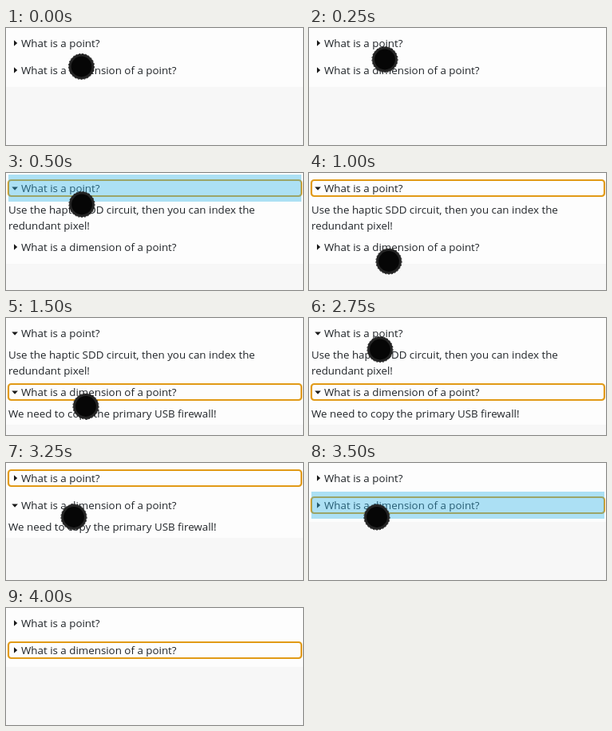
An HTML page that plays this animation: 372x147 px, repeating every 4500 ms.

```html
<!DOCTYPE html>
<html lang="en">
<head>
<meta charset="utf-8">
<title>Accordion</title>
<style>
  html, body { margin: 0; width: 100%; height: 100%; overflow: hidden; background: #f7f7f7; }
  svg { display: block; width: 372px; height: 147px; }
  text { font: 13.35px "Open Sans", "Noto Sans", sans-serif; fill: #212529; white-space: pre; }
  .mark { fill: #1a1a1a; }
  .focus { fill: none; stroke: #e19a16; stroke-width: 2.2; }
  .tap { fill: rgba(51, 181, 229, .4); }
  .core { fill: #060606; stroke: #242424; stroke-width: 3; }
  .rim { fill: none; stroke: #242424; stroke-dasharray: 2 2; }
</style>
</head>
<body>
<svg viewBox="0 0 372 147">
  <rect id="page" width="372" fill="#fdfdfd"/>
  <g id="list"></g>
  <rect id="focus" class="focus" x="3" width="367" height="20" rx="3.5"/>
  <rect id="tap" class="tap" x="3" width="367" height="34"/>
  <g id="pointer">
    <circle class="core" r="14.4"/>
    <circle class="rim" r="16.1"/>
  </g>
</svg>
<script>
const LOOP = 4500, TICK = 250, ROW = 34, LINE = 20;
const items = [
  { title: "What is a point?",
    body: ["Use the haptic SDD circuit, then you can index the", "redundant pixel!"] },
  { title: "What is a dimension of a point?",
    body: ["We need to copy the primary USB firewall!"] }
];

// Each click toggles a row; a glowing one tints it for one tick.
const clicks = [
  { at: 500, row: 0, glow: true },
  { at: 1500, row: 1 },
  { at: 3000, row: 0 },
  { at: 3500, row: 1, glow: true }
];

// The pointer rests between moves and is lifted at the end.
const speedUp = u => u ** 3;
const slowDown = u => 1 - (1 - u) ** 2;
const home = [94.5, 48.5], LIFT = 4000;
const moves = [
  { from: 0, to: 250, end: [95, 39.5], ease: slowDown },
  { from: 500, to: 1000, end: [100, 111], ease: speedUp },
  { from: 2000, to: 2750, end: [89, 39.5], ease: slowDown },
  { from: 2750, to: 3250, end: [85, 68], ease: slowDown },
  { from: 3500, to: 3750, end: [117.5, 109], ease: slowDown }
];

const $ = id => document.getElementById(id);

function add(parent, tag, attrs, text) {
  const el = document.createElementNS("http://www.w3.org/2000/svg", tag);
  for (const k in attrs) el.setAttribute(k, attrs[k]);
  if (text) el.textContent = text;
  parent.append(el);
  return el;
}

for (const item of items) {
  item.row = add($("list"), "g", {});
  item.mark = add(item.row, "path", { class: "mark" });
  add(item.row, "text", { x: 19, y: 22 }, item.title);
  item.lines = add(item.row, "g", {});
  item.body.forEach((s, i) => add(item.lines, "text", { x: 3, y: 49 + i * LINE }, s));
}

function show(el, on) {
  el.setAttribute("visibility", on ? "visible" : "hidden");
}

function pointerAt(t) {
  let pos = home;
  for (const { from, to, end, ease } of moves) {
    const u = ease(Math.min(1, Math.max(0, (t - from) / (to - from))));
    pos = pos.map((p, i) => p + (end[i] - p) * u);
  }
  return pos;
}

function render(t) {
  const done = clicks.filter(c => c.at <= t);
  const last = done.at(-1);
  let y = 2;
  items.forEach((item, i) => {
    const isOpen = done.filter(c => c.row === i).length % 2;
    item.top = y;
    item.row.setAttribute("transform", `translate(0 ${y})`);
    item.mark.setAttribute("d", isOpen ? "M7.3 15.4h7.6l-3.8 4.3z" : "M10 13.2v7.6l4.2-3.8z");
    show(item.lines, isOpen);
    y += ROW + (isOpen ? item.body.length * LINE : 0);
  });
  $("page").setAttribute("height", y + 4);

  show($("focus"), last);
  show($("tap"), last && last.glow && t < last.at + TICK);
  if (last) {
    const { top } = items[last.row];
    $("focus").setAttribute("y", top + 7);
    $("tap").setAttribute("y", top);
  }
  show($("pointer"), t < LIFT);
  $("pointer").setAttribute("transform", `translate(${pointerAt(t)})`);
}

const start = performance.now();
function tick(now) {
  const t = Math.max(0, now - start) % LOOP;
  render(t - t % TICK);
  requestAnimationFrame(tick);
}
render(0);
requestAnimationFrame(tick);
</script>
</body>
</html>
```
